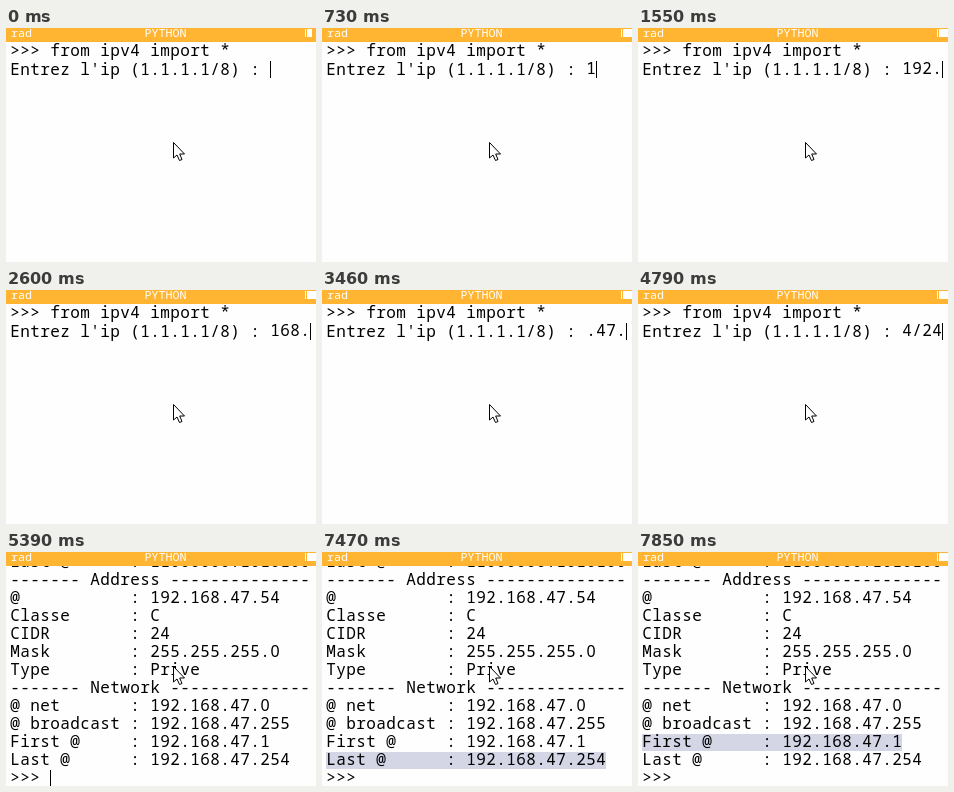
An HTML page with a canvas that plays this animation: 310 by 234 pixels, repeating every 8000 ms.

```html
<!DOCTYPE html>
<html lang="fr">
<head>
<meta charset="utf-8">
<title>Python console</title>
<style>
html, body { margin: 0; width: 100%; height: 100%; overflow: hidden; background: #fefefe; }
canvas { display: block; }
</style>
</head>
<body>
<canvas id="stage" width="310" height="234"></canvas>
<script>
const ctx = document.getElementById('stage').getContext('2d');
const LOOP = 8000, LEFT = 4, CELL = 10, ROW = 18, INPUT_X = 264;
const MONO = '"Noto Sans Mono", monospace';
const SANS = '"Noto Sans", sans-serif';

const ip = '192.168.47.54/24';
const keyTimes = [730, 1060, 1260, 1550, 1680, 1930, 2130, 2600,
  2860, 3070, 3460, 3790, 3940, 4260, 4590, 4790];

const field = (name, value) => name.padEnd(12) + ': ' + value;
const heading = name => '-'.repeat(7) + ` ${name} ` + '-'.repeat(14);
const output = [
  field('Last @', '11000000.1010100'),
  heading('Address'),
  field('@', '192.168.47.54'),
  field('Classe', 'C'),
  field('CIDR', '24'),
  field('Mask', '255.255.255.0'),
  field('Type', 'Prive'),
  heading('Network'),
  field('@ net', '192.168.47.0'),
  field('@ broadcast', '192.168.47.255'),
  field('First @', '192.168.47.1'),
  field('Last @', '192.168.47.254'),
  '>>>'
];

function rect(x, y, w, h, color) {
  ctx.fillStyle = color;
  ctx.fillRect(x, y, w, h);
}

// One glyph per cell; the zero is plain, without a slash.
function print(text, x, y) {
  ctx.fillStyle = '#000';
  ctx.textAlign = 'center';
  [...text].forEach((c, i) => {
    ctx.font = '300 16px ' + (c === '0' ? SANS : MONO);
    ctx.fillText(c, x + i * CELL + CELL / 2, y);
  });
}

function caret(x, y) {
  rect(x, y, 1, 17, '#000');
}

function drawPrompt(t) {
  print('>>> from ipv4 import *', LEFT, 28);
  print("Entrez l'ip (1.1.1.1/8) :", LEFT, 47);
  const typed = keyTimes.filter(k => t >= k).length;
  const shown = ip.slice(Math.max(0, typed - 4), typed);
  print(shown, INPUT_X, 46);
  caret(INPUT_X + shown.length * CELL, 33);
}

function drawOutput(t) {
  const selected = t >= 7850 ? 10 : t >= 7470 ? 11 : 12;
  if (selected < 12) {
    rect(LEFT, 2 + selected * ROW, output[selected].length * CELL, ROW - 1, '#d4d6e6');
  } else {
    caret(44, 218);
  }
  output.forEach((line, i) => print(line, LEFT, 15 + i * ROW));
}

function drawHeader(t) {
  rect(0, 0, 310, 14, '#ffb531');
  ctx.fillStyle = '#fff';
  ctx.textAlign = 'left';
  ctx.font = '11.667px ' + MONO;
  ctx.fillText('rad', 5, 9);
  ctx.fillText('PYTHON', 138.5, 9);
  rect(299, 1, 1, 8, '#fff');
  rect(301, 1, t < 60 ? 5 : 9, 8, '#fff');
}

function drawPointer() {
  ctx.beginPath();
  [[167.5, 114.5], [167.5, 130], [171, 127], [173.5, 132.5],
   [176, 131.5], [173.7, 126], [178.5, 126]].forEach(p => ctx.lineTo(...p));
  ctx.closePath();
  ctx.fillStyle = '#fff';
  ctx.fill();
  ctx.lineWidth = 1;
  ctx.strokeStyle = '#000';
  ctx.stroke();
}

const start = performance.now();
function frame() {
  const t = (performance.now() - start) % LOOP;
  rect(0, 0, 310, 234, '#fefefe');
  (t < 5390 ? drawPrompt : drawOutput)(t);
  drawHeader(t);
  drawPointer();
  requestAnimationFrame(frame);
}
frame();
</script>
</body>
</html>
```
